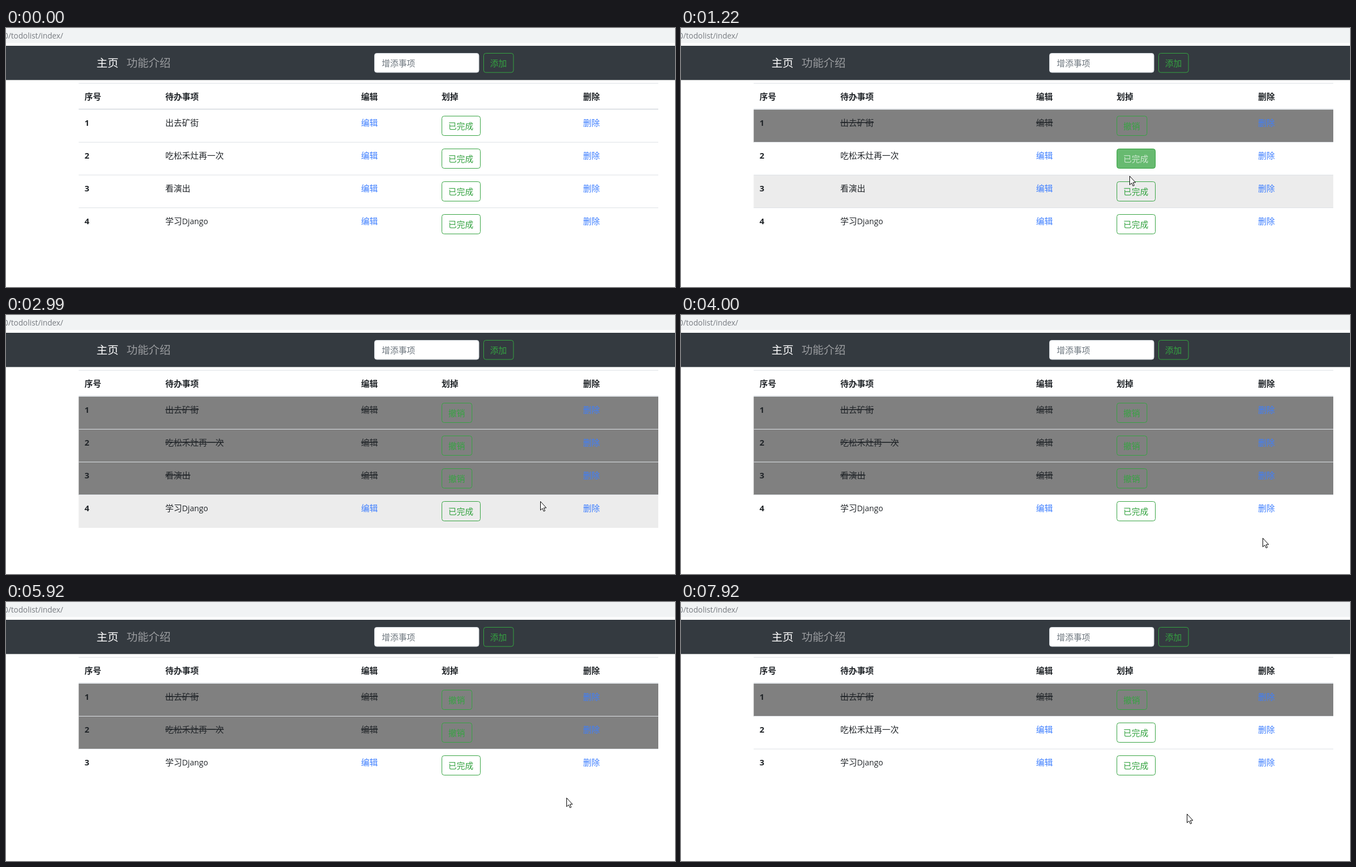
An HTML page that plays this animation: 1201 px wide and 466 px high, repeating every 8 s.

```html
<!DOCTYPE html>
<html lang="zh">
<head>
<meta charset="utf-8">
<title>todolist</title>
<style>
  html, body { margin: 0; height: 100%; overflow: hidden; background: #fff; }
  svg { display: block; width: 100vw; height: 100vh; }
  text { font: 15px "Open Sans", "Noto Sans CJK SC", "Noto Sans CJK", sans-serif; fill: #212529; white-space: pre; }
  .url { font-size: 13.8px; fill: #777b80; }
  .nav { font-size: 19.8px; fill: #9a9c9f; }
  .on { fill: #fff; }
  .bold { font-weight: 700; }
  .hint { fill: #6c757d; }
  .link { fill: #3d7eff; }
  .link.hot { fill: #0056b3; text-decoration: underline; }
  .struck { text-decoration: line-through; }
  .latin { font-size: 14.2px; }
  .btn { stroke: #35a341; }
  .green { fill: #35a341; }
  .cursor { fill: #fff; stroke: #000; stroke-linejoin: round; }
</style>
</head>
<body>
<svg viewBox="0 0 1201 466" preserveAspectRatio="none">
  <rect width="1201" height="27" fill="#f1f3f4"/>
  <text class="url" x="-4" y="18.5">0/todolist/index/</text>
  <rect y="32" width="1201" height="61.6" fill="#343a40"/>
  <text class="nav on" x="162.5" y="70.4">主页</text>
  <text class="nav" x="216.5" y="70.4">功能介绍</text>
  <rect x="661.5" y="45.5" width="187.5" height="34.5" rx="4" fill="#fff" stroke="#ced4da"/>
  <text class="hint" x="674.5" y="68.8">增添事项</text>
  <rect class="btn" x="857.5" y="45.5" width="53.5" height="34.5" rx="4" fill="none"/>
  <text class="green" x="869" y="68.8">添加</text>
  <rect x="130.5" y="99" width="1040.5" height="1" fill="#dee2e6"/>
  <g id="head"></g>
  <rect x="130.5" y="145" width="1040.5" height="2" fill="#dee2e6"/>
  <g id="rows"></g>
  <g id="cursor" class="cursor"></g>
</svg>
<script>
const LOOP = 8000, TICK = 77, LEAD = 14;
const TOP = 147, PITCH = 59;
const COL = { no: 141, name: 286, edit: 637.5, done: 782, del: 1036 };
const GREEN = [53, 163, 65];
const NAMES = ['出去矿街', '吃松禾灶再一次', '看演出', '学习<tspan class="latin">Django</tspan>'];

const byId = id => document.getElementById(id);
const rowTop = i => TOP + PITCH * i;
const onButton = i => [COL.done + 23, rowTop(i) + 21];
const onDelete = i => [COL.del + 14, rowTop(i) + 20];

// Pointer moves: it reaches `to` at a tick, after moving for `dur` ticks.
// A press lands just before the pointer sets off again.
const move = (at, dur, to) => ({ at, dur, to });
const press = (at, dur, to) => ({ at, dur, to, press: true });
const START = [893, 415];
const moves = [
  press(10, 9, onButton(0)),
  move(17, 6, onButton(2)),
  press(22, 4, onButton(1)),
  move(26, 1, [823, 249]),
  press(28, 2, onButton(2)),
  move(34, 5, [932, 315]),
  move(39, 4, [959, 335]),
  move(40, 1, [1020, 356]),
  move(48, 6, [1026, 356]),
  move(53, 4, [1050, 416]),
  move(59, 4, [1062, 446]),
  move(63, 4, [1102, 371]),
  press(70, 4, onDelete(2)),
  move(77, 3, [1006, 352]),
  move(87, 9, [837, 265]),
  press(89, 2, onButton(1)),
  move(100, 6, [928, 396]),
  move(103, 2, [908, 381])
];

const presses = moves.flatMap((m, i) => {
  const next = moves[i + 1];
  return m.press ? [{ tick: next.at - next.dur - 1, to: m.to }] : [];
});

function pointer(k) {
  if (k < 1) return null;
  let [x, y] = START;
  for (const { at, dur, to } of moves) {
    const f = Math.min(1, Math.max(0, 1 - (at - k) / dur));
    x += (to[0] - x) * f;
    y += (to[1] - y) * f;
    if (k <= at) break;
  }
  return [Math.round(x), Math.round(y)];
}

// Replay every press so far: a link removes its row, a button toggles it.
function listAt(k) {
  const list = NAMES.map(name => ({ name, done: false }));
  for (const { tick, to: [x, y] } of presses) {
    if (tick > k) break;
    const i = Math.floor((y - TOP) / PITCH);
    if (x > COL.del) list.splice(i, 1);
    else list[i].done = !list[i].done;
  }
  return list;
}

// A reloaded page does not know the pointer until it moves.
const reloading = k => presses.some(p => k === p.tick || k === p.tick + 1);

const buttonWidth = done => done ? 54 : 69;
const inside = (p, x, y, w, h) =>
  !!p && p[0] >= x && p[0] < x + w && p[1] >= y && p[1] < y + h;
const overText = (p, x, i) => inside(p, x, rowTop(i) + 14, 31, 18);

function overButton(i, k) {
  const task = listAt(k)[i];
  return !!task && inside(pointer(k), COL.done, rowTop(i) + 11, buttonWidth(task.done) + 1, 36);
}

// The fill eases in and out over two ticks.
function fillLevel(i, k) {
  const lit = n => overButton(i, n) && !reloading(n) ? 1 : 0;
  return reloading(k) ? 0 : .25 * lit(k) + .75 * lit(k - 1);
}

const label = (x, y, text, cls = '') => `<text class="${cls}" x="${x}" y="${y}">${text}</text>`;
const band = (y, h, fill) => `<rect x="130.5" y="${y}" width="1040.5" height="${h}" fill="${fill}"/>`;
const towardWhite = f => `rgb(${GREEN.map(c => Math.round(c + (255 - c) * f))})`;

function row({ name, done }, i, k, last) {
  const y = rowTop(i), base = y + 28.5;
  const p = reloading(k) ? null : pointer(k);
  const level = fillLevel(i, k);
  const back = inside(p, 130, y, 1041, PITCH) ? '#ececec' : done ? '#808080' : '#fff';
  const link = x => overText(p, x, i) ? 'link hot' : 'link';
  return band(y, PITCH, back)
    + (last ? '' : band(y + PITCH - 1, 1, '#dee2e6'))
    + label(COL.no, base, i + 1, 'bold')
    + label(COL.name, base, name, done ? 'struck' : '')
    + label(COL.edit, base, '编辑', done ? 'struck' : link(COL.edit))
    + `<rect class="btn" x="${COL.done + .5}" y="${y + 11.5}" width="${buttonWidth(done)}" height="35"`
    + ` rx="4" fill="rgb(${GREEN})" fill-opacity="${level}"/>`
    + `<text x="794" y="${y + 35}" style="fill:${towardWhite(level)}">${done ? '撤销' : '已完成'}</text>`
    + label(COL.del, base, '删除', link(COL.del));
}

const ARROW = '<path d="M.5.5V16.2L4 12.9L6.4 18.2L8.7 17.2L6.4 12H11Z"/>';
const HAND = '<path d="M-2 13V2Q-2 .5-.5 .5T1 2V8Q1 6.8 2.5 6.8T4 8.4Q4 7.4 5.4 7.5T6.8 9'
  + 'Q6.8 8.3 8 8.4T9.3 10V15L7 19V21.5H-1V19.5L-5.6 13.3Q-6.2 11.5-4.7 11.2T-2 13Z'
  + 'M1 8V11M4 8.4V11M6.8 9V11.5"/>';

function draw(k) {
  const p = pointer(k), list = listAt(k);
  byId('rows').innerHTML = list.map((task, i) => row(task, i, k, i === list.length - 1)).join('');
  const hand = list.some((task, i) => overButton(i, k) || overText(p, COL.del, i));
  byId('cursor').innerHTML = !p ? '' : `<g transform="translate(${p})">${hand ? HAND : ARROW}</g>`;
}

const titles = ['序号', '待办事项', '编辑', '划掉', '删除'];
byId('head').innerHTML = Object.values(COL).map((x, i) => label(x, 128.6, titles[i], 'bold')).join('');

let shown = -1;
function frame() {
  const k = Math.floor((performance.now() % LOOP + LEAD) / TICK);
  if (k !== shown) draw(shown = k);
  requestAnimationFrame(frame);
}
frame();
</script>
</body>
</html>
```
